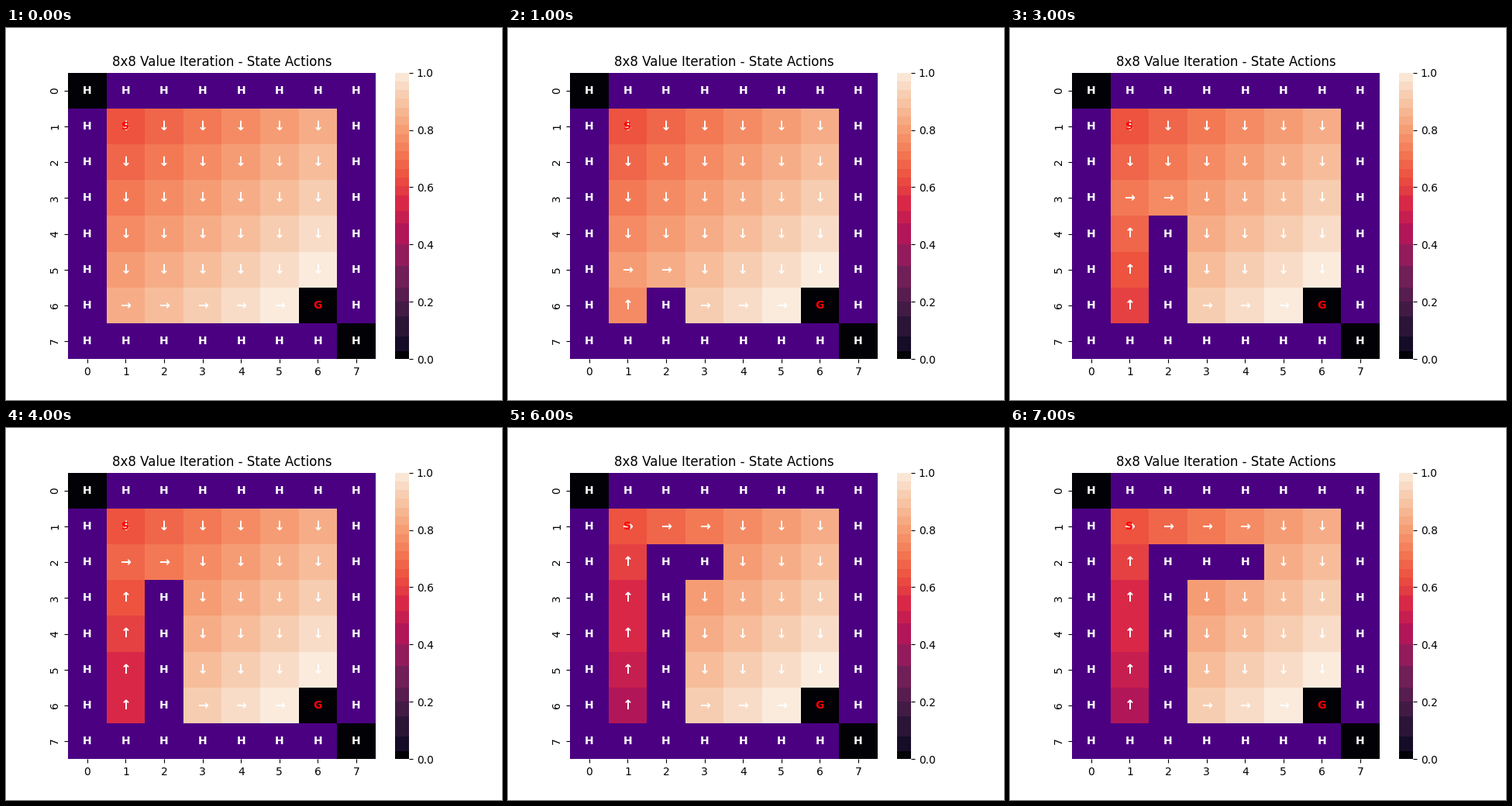
Recreate the animation shown at these times as a matplotlib script. Size 640 by 480 pixels, loop 8 s.

```python
import numpy as np
import matplotlib.pyplot as plt
from matplotlib.animation import FuncAnimation
from matplotlib.colors import LinearSegmentedColormap, ListedColormap, to_rgb

plt.rcParams["font.family"] = "DejaVu Sans"

SIZE = 8
START, GOAL = (1, 1), (6, 6)
STEP_COST = 0.04
HOLE = to_rgb("indigo")
BLACK = to_rgb("#010106")
MOVES = {"↓": (1, 0), "→": (0, 1), "↑": (-1, 0), "←": (0, -1)}
# Holes appear one at a time, in this order.
NEW_HOLES = [(6, 2), (5, 2), (4, 2), (3, 2), (2, 2), (2, 3), (2, 4)]

rocket = LinearSegmentedColormap.from_list("rocket", [
    "#03051a", "#221331", "#451c47", "#6a1f56", "#921c5b", "#b91657",
    "#d92847", "#ed513e", "#f47c56", "#f6a47b", "#f7c9aa", "#faebdd"], N=1024)

# Uneven colour bands: wide in the dark half, narrow in the bright half.
EDGES = np.concatenate([
    [0, .028, .08, .15, .2, .25, .325, .4, .473, .518, .572],
    np.linspace(.603, 1, 14)])
BANDS = [BLACK] + [rocket(m)[:3] for m in (EDGES[1:-1] + EDGES[2:]) / 2]


def shade(value):
    if value > EDGES[10]:
        return rocket(value)[:3]
    return BANDS[np.searchsorted(EDGES, value, side="right") - 1]


def is_hole(cell, count):
    on_border = min(cell) == 0 or max(cell) == SIZE - 1
    return on_border or cell in NEW_HOLES[:count]


def distances(count):
    """Steps to the goal for every free cell."""
    dist, queue = {GOAL: 0}, [GOAL]
    for r, c in queue:
        for dr, dc in MOVES.values():
            cell = (r + dr, c + dc)
            if cell not in dist and not is_hole(cell, count):
                dist[cell] = dist[(r, c)] + 1
                queue.append(cell)
    return dist


def best_move(cell, dist):
    for arrow, (dr, dc) in MOVES.items():
        if dist.get((cell[0] + dr, cell[1] + dc), 99) < dist[cell]:
            return arrow
    return ""


fig = plt.figure(figsize=(6.4, 4.8), dpi=100)
ax = fig.add_axes([0.125, 0.11, 0.62, 0.77])
ax.set_title("8x8 Value Iteration - State Actions")
grid = ax.pcolormesh(np.zeros((SIZE, SIZE, 3)))
ax.set(xlim=(0, SIZE), ylim=(SIZE, 0))
ticks = np.arange(SIZE) + 0.5
ax.set_xticks(ticks, range(SIZE))
ax.set_yticks(ticks, range(SIZE), rotation="vertical", va="center")
ax.spines[:].set_visible(False)

cax = fig.add_axes([0.78375, 0.11, 0.028875, 0.77])
cax.pcolormesh([0, 1], EDGES, np.arange(len(BANDS))[:, None],
               cmap=ListedColormap(BANDS))
cax.set(xlim=(0, 1), ylim=(0, 1), xticks=[])
cax.yaxis.tick_right()
cax.spines[:].set_visible(False)


def put(cell, text, color):
    return ax.text(cell[1] + 0.5, cell[0] + 0.5, text, color=color,
                   weight="bold", ha="center", va="center")


labels = {(r, c): put((r, c), "", "white")
          for r in range(SIZE) for c in range(SIZE)}
put(START, "S", "red")
put(GOAL, "G", "red")


def update(count):
    dist = distances(count)
    colors = np.zeros((SIZE, SIZE, 3))
    for cell, label in labels.items():
        if is_hole(cell, count):
            corner = cell in [(0, 0), (SIZE - 1, SIZE - 1)]
            colors[cell] = BLACK if corner else HOLE
            label.set(text="H", fontsize=10)
        elif cell == GOAL:
            colors[cell] = BLACK
            label.set_text("")
        else:
            colors[cell] = shade(1 - STEP_COST * (dist[cell] - 1))
            label.set(text=best_move(cell, dist), fontsize=12)
    grid.set_array(colors)
    return [grid, *labels.values()]


anim = FuncAnimation(fig, update, frames=len(NEW_HOLES) + 1, interval=1000,
                     init_func=lambda: update(0), repeat=True, repeat_delay=0)
plt.show()
```
